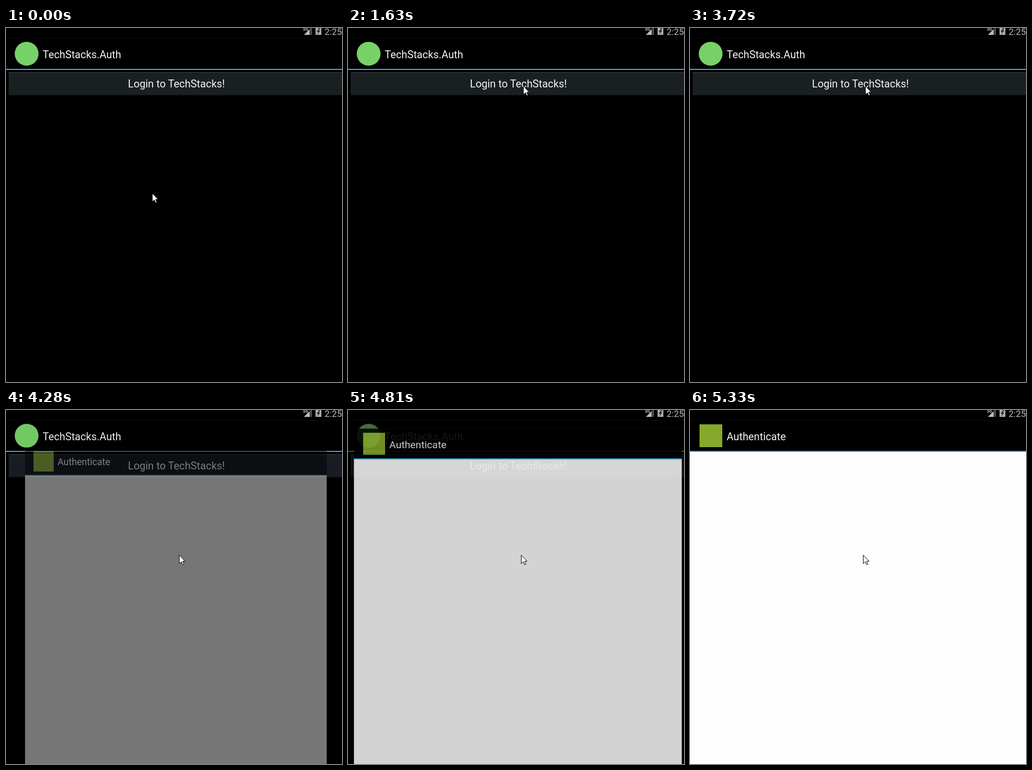
Recreate the animation shown at these times as an HTML page. Size 635 px wide and 667 px high, loop 8000 ms.

```html
<!DOCTYPE html>
<html lang="en">
<head>
<meta charset="utf-8">
<title>Login transition</title>
<style>
  html, body { margin: 0; height: 100%; overflow: hidden; background: #000; }
  svg { display: block; width: 100vw; height: 100vh; }
  text { font: 19.8px Roboto, sans-serif; fill: #f3f3f3; }
  .clock { font-size: 17px; fill: #bcbcbc; }
  .network { font-size: 8px; font-weight: bold; fill: #bcbcbc; }
  .line { fill: #33b5e5; }
</style>
</head>
<body>
<svg viewBox="0 0 635 667">
  <g id="home">
    <circle cx="39" cy="48.5" r="22.5" fill="#78d168"/>
    <text x="69.3" y="57">TechStacks.Auth</text>
    <rect class="line" y="77" width="642" height="2"/>
    <rect x="5" y="83" width="637" height="43.5" fill="#1a2022"/>
    <rect x="5" y="83" width="637" height="1.2" fill="#343b3d"/>
    <rect id="pressed" x="12" y="96" width="619" height="19" fill="#1c1b29"/>
    <text x="322" y="112" text-anchor="middle">Login to TechStacks!</text>
  </g>

  <g id="login">
    <rect y="19" width="642" height="59"/>
    <rect y="19" width="642" height="1" fill="#0e0e0e"/>
    <rect y="79" width="642" height="721" fill="#fdfdfd"/>
    <rect class="line" y="77" width="642" height="2"/>
    <rect x="18" y="27" width="43" height="43" fill="#86a92b"/>
    <text x="69.3" y="57">Authenticate</text>
  </g>

  <g id="status">
    <rect width="635" height="19"/>
    <rect y="19" width="635" height="1" fill="#0e0e0e"/>
    <path d="M575 0H578V13H575Z" fill="#555"/>
    <path d="M563 13L574 2V13Z" fill="#bcbcbc"/>
    <text class="network" x="561" y="5">3G</text>
    <path d="M585 0H596V13H585Z" fill="#aaa"/>
    <path d="M592 0L587 7H590L588 12L594 5H591L594 0Z" fill="#222"/>
    <text class="clock" x="602" y="13">2:25</text>
  </g>

  <path id="cursor" d="M.5 .5V16.5L4.3 13L6.8 18.5L9.2 17.5L6.8 12H11.5Z" fill="#fff" stroke="#000"/>
</svg>
<script>
  const LOOP = 8000;
  const TICK = 267; // the screen refreshes once per tick
  const OPEN_TICK = 15;
  const REVEAL = [0, .44, .825, 1];

  const [home, login, pressed, cursor] =
    ["home", "login", "pressed", "cursor"].map(id => document.getElementById(id));

  const clamp = (v, min, max) => Math.min(max, Math.max(min, v));
  const progress = (v, start, end) => clamp((v - start) / (end - start), 0, 1);
  const mix = (a, b, u) => a + (b - a) * u;
  const curve = (a, b, c, u) => mix(mix(a, b, u), mix(b, c, u), u);
  const easeOut = u => 1 - (1 - u) ** 8;
  const easeInOut = u => u < .5 ? 4 * u ** 3 : 1 - 4 * (1 - u) ** 3;

  // Drift, glide up to the button, then swing back down
  function cursorAt(tick) {
    if (tick < 2) return [276 - tick, 311];
    if (tick < 14) {
      const u = progress(tick, 2, 5.25);
      return [mix(274, 331, easeOut(u)), mix(312, 109, easeInOut(u))];
    }
    const u = progress(tick, 14, 16);
    return [curve(328, 296, 327, u), curve(109, 91, 273, u)];
  }

  function draw(now) {
    const tick = Math.floor((now % LOOP + 15) / TICK);
    const [x, y] = cursorAt(tick).map(Math.round);
    // The window hangs on its first step for three ticks
    const step = tick < OPEN_TICK ? 0 : clamp(tick - OPEN_TICK - 1, 1, 3);
    const shown = REVEAL[step];
    const scale = mix(.8, 1, shown);

    cursor.setAttribute("transform", `translate(${x} ${y})`);
    login.setAttribute("transform",
      `translate(321 480) scale(${scale}) translate(-321 -480)`);
    login.setAttribute("opacity", shown ** .93);
    home.setAttribute("opacity", 1 - shown ** 4);
    pressed.setAttribute("opacity", step === 1 ? 1 : 0);
    requestAnimationFrame(draw);
  }
  draw(performance.now());
</script>
</body>
</html>
```
